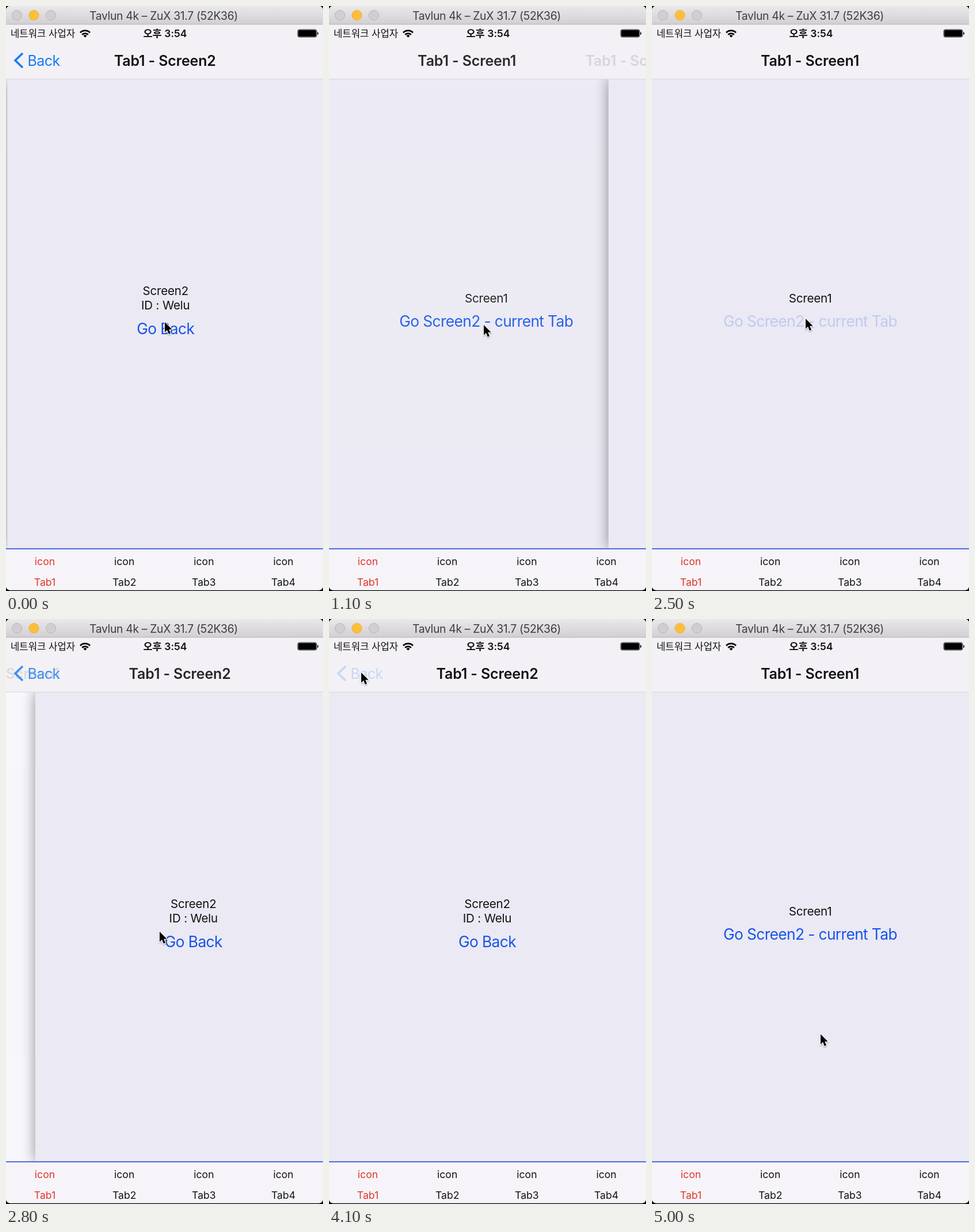
An HTML page for the animation above (5.1 s loop, 551 px wide and 1016 px high).

```html
<!DOCTYPE html>
<html lang="ko">
<head>
<meta charset="utf-8">
<style>
  html, body { margin: 0; height: 100%; overflow: hidden; background: #000; }
  svg { display: block; width: 551px; height: 1016px; }
  text { font-family: Inter, "Noto Sans CJK KR", "Noto Sans CJK", sans-serif; fill: #111; text-anchor: middle; }
  .window { font-size: 19.4px; letter-spacing: -.35px; fill: #403e40; }
  .title { font-size: 25px; font-weight: 600; letter-spacing: -.15px; }
  .body { font-size: 20.6px; letter-spacing: -.2px; }
  .button { font-size: 26.4px; letter-spacing: -.65px; fill: #1654e8; }
  .back { font-size: 25px; letter-spacing: -.6px; fill: #147af5; text-anchor: start; }
  .tab { font-size: 17.6px; }
  .active { fill: #e0342b; }
</style>
</head>
<body>
<svg viewBox="0 0 551 1016">
  <defs>
    <linearGradient id="chrome" x2="0" y2="1">
      <stop stop-color="#eae8ea"/><stop offset="1" stop-color="#d1cfd1"/>
    </linearGradient>
    <filter id="blur"><feGaussianBlur stdDeviation="12"/></filter>
    <filter id="soft" x="-50%" y="-50%" width="200%" height="200%">
      <feDropShadow dx="0" dy="1.5" stdDeviation="1.2" flood-opacity=".35"/>
    </filter>
    <clipPath id="frame"><rect width="551" height="1014.5" rx="7"/></clipPath>
  </defs>
  <g clip-path="url(#frame)">
    <rect width="551" height="1016" fill="#fff"/>

    <g id="screen1">
      <rect y="127" width="551" height="816" fill="#ebe9f3"/>
      <text class="body" x="275" y="515">Screen1</text>
      <text class="button" id="go" x="275" y="557">Go Screen2 - current Tab</text>
    </g>
    <g id="screen2">
      <rect y="127" width="551" height="815" opacity=".42" filter="url(#blur)"/>
      <rect y="127" width="551" height="816" fill="#ebe9f3"/>
      <text class="body" x="275" y="502">Screen2</text>
      <text class="body" x="275" y="527">ID : Welu</text>
      <text class="button" id="goBack" x="275" y="570">Go Back</text>
    </g>

    <rect y="32" width="551" height="95" fill="#f3f1f6"/>
    <rect y="126.5" width="551" height="1" fill="#d5d3d9"/>
    <text class="title" id="title1" x="274.5" y="104">Tab1 - Screen1</text>
    <text class="title" id="title2" x="275" y="104">Tab1 - Screen2</text>
    <g id="back">
      <path d="M29 82 16 94.5 29 107" fill="none" stroke="#147af5" stroke-width="3.6"/>
      <text class="back" x="37.5" y="104">Back</text>
    </g>

    <text x="8" y="53.5" font-size="16.7" style="text-anchor:start">네트워크 사업자</text>
    <text x="276.5" y="53.5" font-size="17.6" font-weight="600">오후 3:54</text>
    <g fill="none" stroke="#000" stroke-width="2.8">
      <path d="M129 46.2a12 12 0 0 1 17 0M132.2 49.8a7.5 7.5 0 0 1 10.6 0"/>
      <path d="M137.5 54.8l-3-3a4.3 4.3 0 0 1 6 0z" fill="#000" stroke="none"/>
    </g>
    <rect x="507" y="40.9" width="33" height="13.2" rx="3" fill="#999" stroke="#222" stroke-width=".9"/>
    <rect x="508.2" y="42" width="30.6" height="11" rx="1.8"/>
    <path d="M541.3 45v5.2q1.8-.6 1.8-2.6t-1.8-2.6z"/>

    <rect y="943" width="551" height="73" fill="#f6f4f8"/>
    <rect y="941.8" width="551" height="1.7" fill="#2a50d6"/>
    <g id="tabs"></g>

    <rect width="551" height="32" fill="url(#chrome)"/>
    <rect y="31.3" width="551" height="1" fill="#b3b1b3"/>
    <g fill="#d0ced0" stroke="#b8b6b8">
      <circle cx="19" cy="16" r="8.6"/>
      <circle cx="48.5" cy="16" r="8.6" fill="#fdbe3c" stroke="#eeb03a"/>
      <circle cx="78" cy="16" r="8.6"/>
    </g>
    <text class="window" x="274" y="23.5">Tavlun 4k – ZuX 31.7 (52K36)</text>
  </g>
  <g id="cursor">
    <path d="M0 0V20.5L4.7 16 8 24 11.7 22.4 8.4 14.8H14.8Z" transform="translate(1 2) scale(.86)"
      stroke="#fff" stroke-width="2.4" paint-order="stroke" filter="url(#soft)"/>
  </g>
</svg>
<script>
const LOOP = 5100, STEP = 100, WIDTH = 551, POINT = WIDTH / 375, DURATION = 500;
const $ = id => document.getElementById(id);

// Each navigation: start time, direction, pressed button
const moves = [
  [-400, 1, 'go'], [917, 0, 'goBack'], [2600, 1, 'go'], [4200, 0, 'back']
];
// Pointer path: time, x, y
const path = [
  [0, 275, 547], [300, 275, 547], [600, 268, 552], [2000, 268, 552], [2300, 266, 541],
  [2900, 266, 541], [3300, 55, 121], [3400, 55, 91], [4600, 55, 91],
  [4800, 128, 460], [4900, 378, 640], [5000, 292, 719]
];

$('tabs').innerHTML = [1, 2, 3, 4].map((n, i) => {
  const label = (s, y) =>
    `<text class="tab ${i ? '' : 'active'}" x="${67.5 + 138.2 * i}" y="${y}">${s}</text>`;
  return label('icon', 971) + label('Tab' + n, 1006.5);
}).join('');

const clamp = v => Math.max(0, Math.min(1, v));
const bezier = (s, a, b) => 3 * (1 - s) ** 2 * s * a + 3 * (1 - s) * s * s * b + s ** 3;

function ease(x) {
  if (x <= 0 || x >= 1) return clamp(x);
  let lo = 0, hi = 1;
  for (let i = 0; i < 24; i++) {
    const mid = (lo + hi) / 2;
    if (bezier(mid, .2833, .31833) < x) lo = mid; else hi = mid;
  }
  return bezier(lo, .99, .99);
}

function pointer(t) {
  const i = path.findIndex(k => k[0] > t);
  if (i < 0) return path[path.length - 1].slice(1);
  const [t0, x0, y0] = path[i - 1], [t1, x1, y1] = path[i];
  const f = (t - t0) / (t1 - t0);
  return [x0 + (x1 - x0) * f, y0 + (y1 - y0) * f];
}

function place(id, x, opacity, y = 0) {
  $(id).setAttribute('transform', `translate(${x} ${y})`);
  $(id).setAttribute('opacity', opacity);
}

function draw(t) {
  const [start, forward] = moves.filter(m => m[0] <= t).pop();
  const e = ease((t - start) / DURATION);
  const p = forward ? e : 1 - e;

  const press = { go: 1, goBack: 1, back: 1 };
  for (const [at, , id] of moves)
    if (t >= at - 200 && t < at + 150) press[id] = .2 + .8 * clamp((t - at) / 150);

  place('screen1', -10 * POINT * p, 1 - .7 * p);
  place('screen2', WIDTH * (1 - p), p > 0 ? 1 : 0);
  place('title1', -200 * POINT * p, 1 - p);
  place('title2', 200 * POINT * (1 - p), p);
  place('back', 0, clamp(2 * p - 1) * press.back);
  place('go', 0, press.go);
  place('goBack', 0, press.goBack);
  const [x, y] = pointer(t);
  place('cursor', x, 1, y);
}

function tick() {
  draw(Math.floor(performance.now() % LOOP / STEP) * STEP);
  requestAnimationFrame(tick);
}
tick();
</script>
</body>
</html>
```
